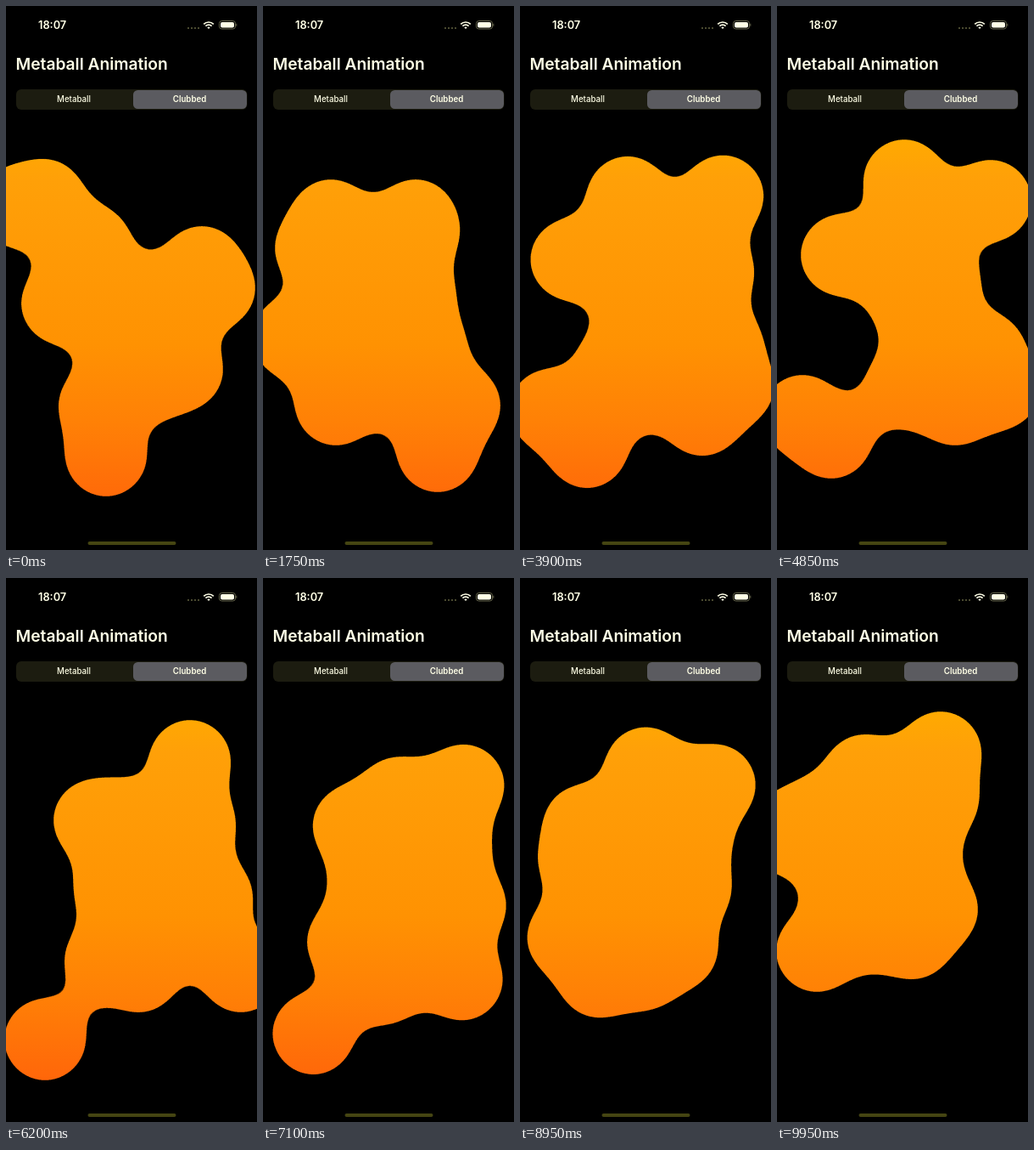
An HTML page that plays this animation: 296 by 640 pixels, repeating every 10000 ms.

```html
<!DOCTYPE html>
<html lang="en">
<head>
<meta charset="utf-8">
<title>Metaball Animation</title>
<style>
  html, body { margin: 0; width: 100%; height: 100%; overflow: hidden; background: #000; }
  svg { display: block; width: 296px; height: 640px; }
  text { font-family: Inter, sans-serif; font-weight: 600; fill: #ffffe6; }
</style>
</head>
<body>
<svg viewBox="0 0 296 640">
  <defs>
    <linearGradient id="heat" gradientUnits="userSpaceOnUse" x1="0" y1="150" x2="0" y2="600">
      <stop offset="0" stop-color="#ffab00"/>
      <stop offset=".12" stop-color="#ffa008"/>
      <stop offset=".55" stop-color="#ff9202"/>
      <stop offset=".76" stop-color="#ff8006"/>
      <stop offset="1" stop-color="#ff640a"/>
    </linearGradient>
    <!-- Blur followed by a steep threshold melts the discs together -->
    <filter id="goo" filterUnits="userSpaceOnUse" x="-90" y="60" width="476" height="620"
            color-interpolation-filters="sRGB">
      <feGaussianBlur stdDeviation="18"/>
      <feComponentTransfer>
        <feFuncR type="linear" slope="45" intercept="-22"/>
        <feFuncG type="linear" slope="45" intercept="-22"/>
        <feFuncB type="linear" slope="45" intercept="-22"/>
      </feComponentTransfer>
    </filter>
    <mask id="blob" maskUnits="userSpaceOnUse" x="0" y="0" width="296" height="640">
      <g id="shapes" filter="url(#goo)" fill="#fff">
        <rect x="-300" y="-100" width="900" height="900" fill="#000"/>
        <polygon id="body"/>
      </g>
    </mask>
  </defs>

  <rect width="296" height="640"/>
  <rect width="296" height="640" fill="url(#heat)" mask="url(#blob)"/>

  <text x="38" y="27" font-size="12.8">18:07</text>
  <path d="M214 26h14" stroke="#4a4a30" stroke-width="2" stroke-dasharray="2 2"/>
  <g fill="none" stroke="#ffffe6" stroke-width="1.7">
    <path d="M233.2 21.4a8.2 8.2 0 0 1 11.6 0M235.4 23.7a5 5 0 0 1 7.2 0"/>
    <path d="M239 27l-1.7-1.8a2.5 2.5 0 0 1 3.4 0z" fill="#ffffe6" stroke="none"/>
  </g>
  <rect x="251.5" y="17.5" width="19" height="9.5" rx="3" fill="none" stroke="#66664c"/>
  <rect x="253" y="19" width="16" height="6.5" rx="2" fill="#ffffe6"/>
  <path d="M271.8 20.7v3" stroke="#66664c"/>

  <text x="11.5" y="75" font-size="19.2">Metaball Animation</text>
  <rect x="12" y="98" width="272.500" height="24" rx="6" fill="#1c1c10"/>
  <rect x="150" y="99" width="134" height="22" rx="5.500" fill="#5b5b60"/>
  <g font-size="9.7" text-anchor="middle">
    <text x="80" y="113" style="font-weight:500">Metaball</text>
    <text x="216.500" y="113">Clubbed</text>
  </g>
  <rect x="96.500" y="630" width="104" height="4" rx="2" fill="#454512"/>
</svg>

<script>
const LOOP = 10000, RADIUS = 51;
const times = [0, 1750, 3000, 4850, 6200, 8000, 9950];
// Disc centres as x, y pairs, clockwise around the blob
const poses = [
  [14,236, 45,228, 100,282, 231,307, 246,332, 208,428, 172,440, 118,529, 110,470, 66,350],
  [62,285, 80,252, 180,252, 184,265, 179,340, 192,400, 232,470, 206,524, 86,469, 35,390],
  [51,300, 100,254, 217,221, 256,293, 225,380, 237,440, 215,489, 106,533, 57,465, 70,385],
  [76,293, 150,205, 252,229, 192,325, 245,408, 262,450, 210,469, 64,508, 30,482, 152,448],
  [104,285, 135,284, 217,215, 223,290, 243,375, 277,463, 157,463, 46,543, 117,450, 128,365],
  [99,297, 177,224, 253,266, 212,335, 228,392, 192,470, 137,485, 78,513, 69,415, 115,355],
  [45,282, 103,232, 193,205, 190,260, 168,325, 189,390, 160,424, 108,415, 47,439, 10,300]
];
const last = times.length - 1;

const shapes = document.getElementById("shapes");
const body = document.getElementById("body");

function addCircle(attributes) {
  const circle = document.createElementNS("http://www.w3.org/2000/svg", "circle");
  for (const name in attributes) circle.setAttribute(name, attributes[name]);
  return shapes.appendChild(circle);
}

const discs = Array.from({ length: poses[0].length / 2 }, () => addCircle({ r: RADIUS }));
const hole = addCircle({ cx: 131, cy: 346, fill: "#000" });

function slope(pose, k) {
  const a = Math.max(pose - 1, 0), b = Math.min(pose + 1, last);
  return (poses[b][k] - poses[a][k]) / (times[b] - times[a]);
}

// Cubic Hermite curve through the poses
function coordinate(k, i, t) {
  const span = times[i + 1] - times[i];
  const u = Math.min((t - times[i]) / span, 1), v = 1 - u;
  return v * v * (1 + 2 * u) * poses[i][k] + u * u * (1 + 2 * v) * poses[i + 1][k]
    + span * u * v * (v * slope(i, k) - u * slope(i + 1, k));
}

function draw(t) {
  let i = 0;
  while (i < last - 1 && t >= times[i + 1]) i++;
  const points = poses[0].map((_, k) => coordinate(k, i, t));
  body.setAttribute("points", points.join(" "));
  discs.forEach((disc, n) => {
    disc.setAttribute("cx", points[2 * n]);
    disc.setAttribute("cy", points[2 * n + 1]);
  });
  hole.setAttribute("r", 27 * Math.max(0, 1 - ((t - 3000) / 800) ** 2));
}

function frame() {
  draw(performance.now() % LOOP);
  requestAnimationFrame(frame);
}
frame();
</script>
</body>
</html>
```
